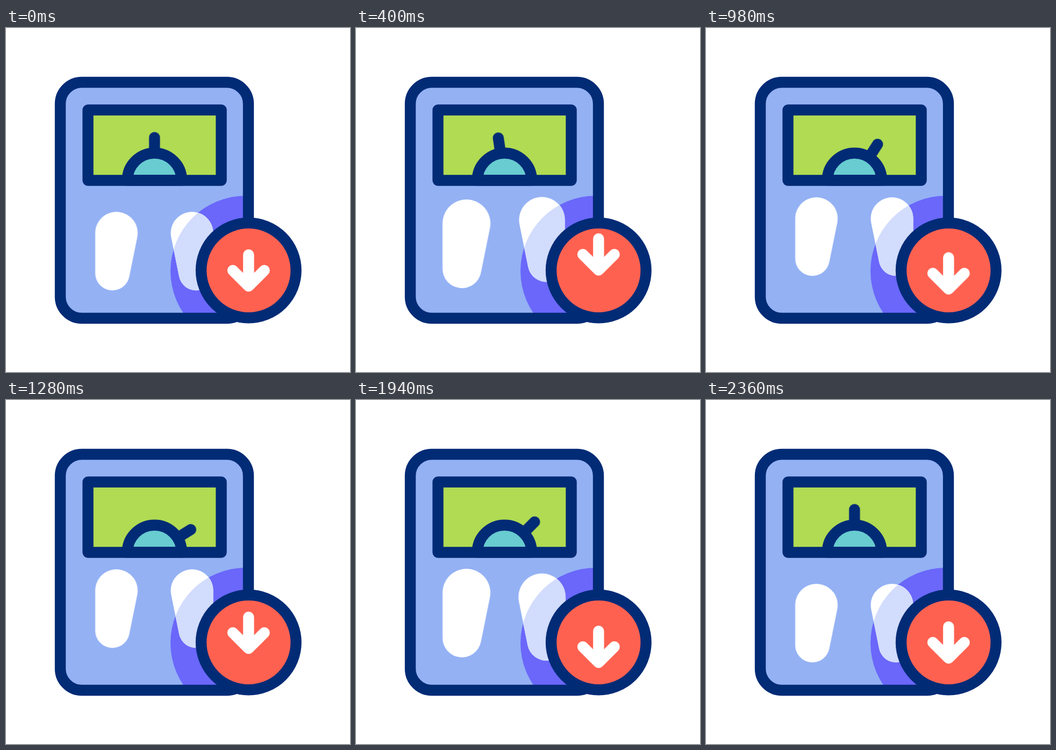
Write an HTML page that moves like this. It is 640 by 640 pixels and loops after 2400 ms.

```html
<!DOCTYPE html>
<html lang="en">
<head>
<meta charset="utf-8">
<title>Scale</title>
<style>
  html, body { margin: 0; width: 100%; height: 100%; overflow: hidden; background: #fff; }
  svg { display: block; width: 100%; height: 100%; }
  .line { stroke: #022b76; stroke-width: 20.4; stroke-linecap: round; stroke-linejoin: round; }
</style>
</head>
<body>
<svg viewBox="0 0 640 640">
  <defs>
    <clipPath id="shade"><circle cx="446" cy="452" r="140"/></clipPath>
    <clipPath id="inside"><rect x="101" y="101" width="350" height="439" rx="40"/></clipPath>
    <path id="foot" d="M-39.5-33.5A39.5 39.5 0 1 1 38.7-25.6L23.9 47.4A32 32 0 0 1-39.5 41Z"/>
    <use id="mirrored" href="#foot" transform="scale(-1 1)"/>
  </defs>

  <rect x="101" y="101" width="350" height="439" rx="40" fill="#94b1f4"/>
  <circle cx="446" cy="452" r="140" fill="#6a67fa" clip-path="url(#inside)"/>

  <g class="left" fill="#fff"><use href="#foot"/></g>
  <g class="right" fill="#fff"><use href="#mirrored"/></g>
  <g clip-path="url(#shade)">
    <g class="right" fill="#d2dcfd"><use href="#mirrored"/></g>
  </g>

  <rect class="line" x="101" y="101" width="350" height="439" rx="40" fill="none"/>

  <rect class="line" x="152.5" y="152.5" width="248" height="131" fill="#b0db52"/>
  <g class="needle"><path class="line" d="M0-56V-79.6"/></g>
  <path class="line" d="M225.8 283.2a50.5 50.5 0 0 1 101 0Z" fill="#68ccd0"/>

  <circle class="line" cx="451.3" cy="451" r="88.3" fill="#ff6150"/>
  <g class="arrow">
    <path d="M451.3 422V480M422 451L451.3 480.3L480.6 451" fill="none" stroke="#fff"
      stroke-width="20.4" stroke-linecap="round" stroke-linejoin="round"/>
  </g>
</svg>
<script>
  const LOOP = 2400;

  // steps: [time in ms, ...values], linear in between
  function play(selector, steps, pose) {
    const all = [...steps, [LOOP, ...steps[steps.length - 1].slice(1)]];
    const frames = all.map(([time, ...values]) => ({
      offset: time / LOOP,
      transform: pose(...values)
    }));
    for (const el of document.querySelectorAll(selector)) {
      el.animate(frames, { duration: LOOP, iterations: Infinity }).startTime = start;
    }
  }

  const start = document.timeline.currentTime ?? 0;
  const footAt = x => (y, s) => `translate(${x}px, ${y}px) scale(${s})`;
  const DOWN = [415, 1], MID = [398.3, 1.157], UP = [388, 1];

  play('.left', [
    [0, ...DOWN], [184, ...DOWN], [451, ...MID], [717, ...UP],
    [1660, ...UP], [2010, ...MID], [2360, ...DOWN]
  ], footAt(205.5));

  play('.right', [
    [0, ...DOWN], [267, ...MID], [533, ...UP],
    [1480, ...UP], [1835, ...MID], [2170, ...DOWN]
  ], footAt(346));

  play('.needle', [
    [0, 0], [140, 0], [765, -20], [1085, 58], [1868, 58], [2188, 0]
  ], a => `translate(276.3px, 283.2px) rotate(${a}deg)`);

  play('.arrow', [
    [0, 0], [410, -30.5], [820, 25], [1230, -25], [1640, 30.5], [2050, 0]
  ], y => `translate(0px, ${y}px)`);
</script>
</body>
</html>
```
